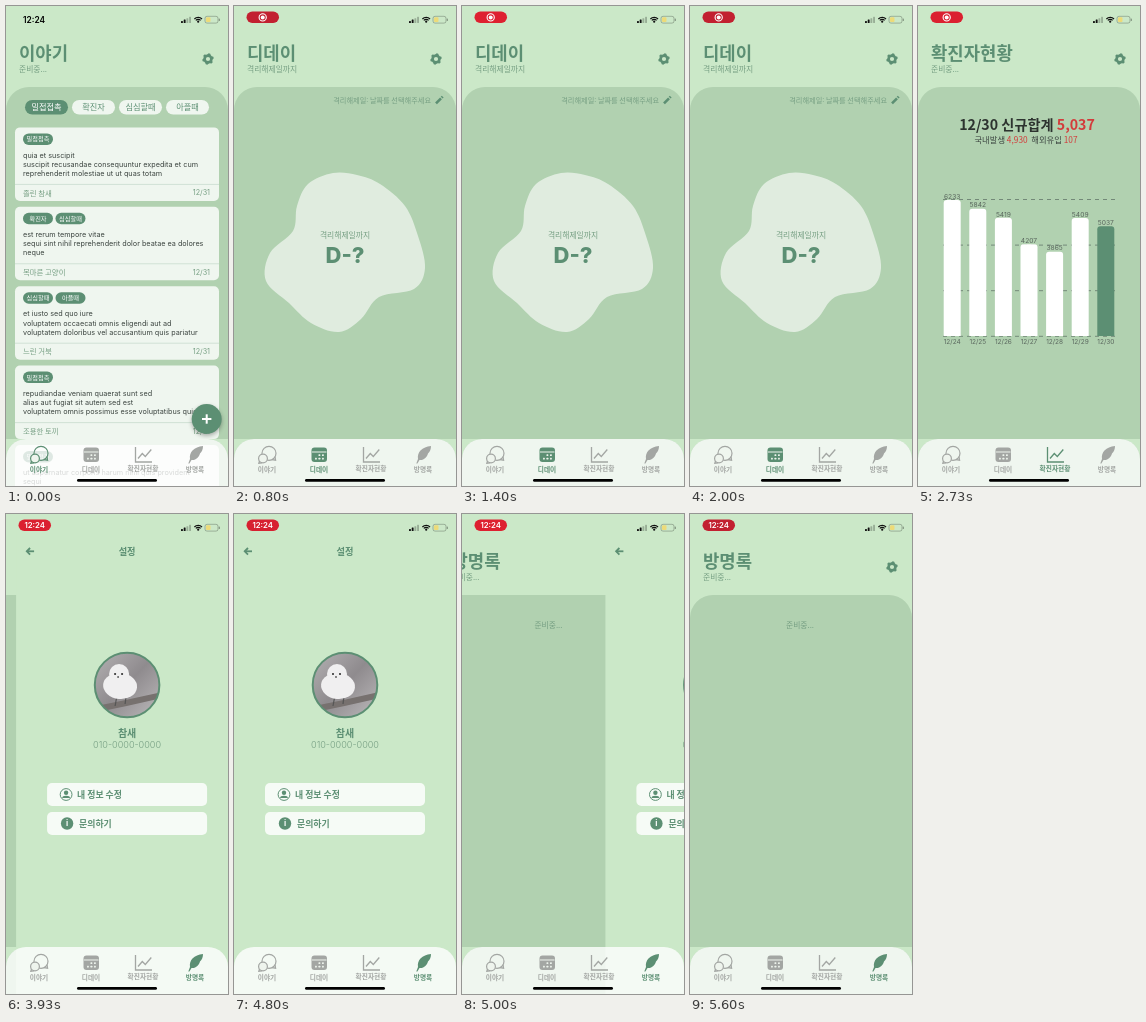
Write an HTML page with a canvas that moves like this. It is 222 by 480 pixels and loops after 5.67 s.

```html
<!DOCTYPE html>
<html lang="ko">
<head>
<meta charset="utf-8">
<style>
html, body { margin: 0; width: 100%; height: 100%; overflow: hidden; background: #cbe8c8; }
canvas { display: block; width: 222px; height: 480px; }
</style>
</head>
<body>
<canvas id="stage"></canvas>
<script>
const W = 222, H = 480, LOOP = 5670;
const canvas = document.getElementById('stage');
const c = canvas.getContext('2d');
const ratio = window.devicePixelRatio || 1;
canvas.width = W * ratio;
canvas.height = H * ratio;

const BG = '#cbe8c8', PANEL = '#b1d1b0', GREEN = '#5c8f73', SOFT = '#769f83';
const INK = '#3c4540', GREY = '#a3a6a3', RED = '#d33b3b';
const KR = '"Noto Sans CJK KR", "Noto Sans CJK", sans-serif';
const LATIN = 'Inter, sans-serif';

const TABS = ['이야기', '디데이', '확진자현황', '방명록'];
const CHIPS = ['밀접접촉', '확진자', '심심할때', '아플때'];
const CARDS = [
  { tags: [0], by: '졸린 참새', lines: ['quia et suscipit', 'suscipit recusandae consequuntur expedita et cum', 'reprehenderit molestiae ut ut quas totam'] },
  { tags: [1, 2], by: '목마른 고양이', lines: ['est rerum tempore vitae', 'sequi sint nihil reprehenderit dolor beatae ea dolores', 'neque'] },
  { tags: [2, 3], by: '느린 거북', lines: ['et iusto sed quo iure', 'voluptatem occaecati omnis eligendi aut ad', 'voluptatem doloribus vel accusantium quis pariatur'] },
  { tags: [0], by: '조용한 토끼', lines: ['repudiandae veniam quaerat sunt sed', 'alias aut fugiat sit autem sed est', 'voluptatem omnis possimus esse voluptatibus quis'] },
  { tags: [0], by: '', lines: ['ut aspernatur corporis harum nihil quis provident', 'sequi'] }
];
const CASES = [6233, 5842, 5419, 4207, 3865, 5409, 5037];
const BLOB = [[99, 167], [123, 169], [146, 178], [171, 200], [184, 230], [191, 262], [180, 283], [145, 291],
  [127, 313], [105, 326], [77, 317], [55, 297], [32, 275], [36, 247], [59, 225], [63, 200], [74, 178]];

function text(s, x, y, size, color, align = 'left', weight = 400, family = KR) {
  c.font = `${weight} ${size}px ${family}`;
  c.fillStyle = color;
  c.textAlign = align;
  c.textBaseline = 'alphabetic';
  c.fillText(s, x, y + size * 0.36);
}

function box(x, y, w, h, r, color) {
  c.beginPath();
  c.roundRect(x, y, w, h, r);
  c.fillStyle = color;
  c.fill();
}

function disc(x, y, r, color) {
  c.beginPath();
  c.arc(x, y, r, 0, 7);
  c.fillStyle = color;
  c.fill();
}

function ring(x, y, r, color, width) {
  c.beginPath();
  c.arc(x, y, r, 0, 7);
  c.strokeStyle = color;
  c.lineWidth = width;
  c.stroke();
}

function line(points, color, width) {
  c.beginPath();
  points.forEach(([x, y]) => c.lineTo(x, y));
  c.strokeStyle = color;
  c.lineWidth = width;
  c.stroke();
}

// Runs of [string, colour] centred as one line.
function runs(parts, x, y, size, weight) {
  c.font = `${weight} ${size}px ${KR}`;
  const widths = parts.map(p => c.measureText(p[0]).width);
  x -= widths.reduce((a, b) => a + b, 0) / 2;
  parts.forEach(([s, color], i) => {
    text(s, x, y, size, color, 'left', weight);
    x += widths[i];
  });
}

// Closed curve through the given points.
function smooth(pts, color) {
  const n = pts.length, at = i => pts[(i + n) % n];
  c.beginPath();
  c.moveTo(...pts[0]);
  for (let i = 0; i < n; i++) {
    const [a, p, q, b] = [at(i - 1), at(i), at(i + 1), at(i + 2)];
    c.bezierCurveTo(p[0] + (q[0] - a[0]) / 6, p[1] + (q[1] - a[1]) / 6,
      q[0] - (b[0] - p[0]) / 6, q[1] - (b[1] - p[1]) / 6, q[0], q[1]);
  }
  c.fillStyle = color;
  c.fill();
}

function gear(x, y) {
  c.beginPath();
  for (let i = 0; i < 24; i++) {
    const a = (i + 0.5) * Math.PI / 12, r = i % 4 < 2 ? 5.8 : 4.7;
    c.lineTo(x + r * Math.sin(a), y - r * Math.cos(a));
  }
  c.closePath();
  c.moveTo(x + 2.1, y);
  c.arc(x, y, 2.1, 0, 7);
  c.fillStyle = GREEN;
  c.fill('evenodd');
}

function frame(title, sub) {
  box(0, 0, W, H, 0, BG);
  text(title, 13, 47.8, 17.8, GREEN, 'left', 900);
  text(sub, 13, 63, 7.8, SOFT);
  gear(202, 53);
  box(0, 81, W, H - 81, [23, 23, 0, 0], PANEL);
}

function card(d, y) {
  box(9, y, 204, 73.5, 5, 'rgba(255,255,255,.8)');
  d.tags.forEach((t, i) => {
    box(17 + i * 32.5, y + 6, 30, 11.5, 5.75, GREEN);
    text(CHIPS[t], 32 + i * 32.5, y + 11.8, 6.2, '#fff', 'center', 500);
  });
  d.lines.forEach((s, i) => text(s, 17, y + 27.5 + i * 9.2, 7.25, INK, 'left', 400, LATIN));
  line([[9, y + 57], [213, y + 57]], 'rgba(92,143,115,.3)', 0.7);
  text(d.by, 17, y + 65.5, 7.4, SOFT, 'left', 500);
  text('12/31', 204, y + 65.5, 7.2, SOFT, 'right', 400, LATIN);
}

function stories() {
  frame(TABS[0], '준비중...');
  CHIPS.forEach((s, i) => {
    box(19 + i * 47, 94, 43, 14.5, 7.25, i ? 'rgba(255,255,255,.8)' : GREEN);
    text(s, 40.5 + i * 47, 101.2, 8.2, i ? GREEN : '#fff', 'center', 500);
  });
  CARDS.forEach((d, i) => card(d, 121.4 + i * 79.4));
  c.save();
  c.shadowColor = 'rgba(0,0,0,.3)';
  c.shadowBlur = 4 * ratio;
  c.shadowOffsetY = 2 * ratio;
  disc(200.7, 413, 15, GREEN);
  c.restore();
  line([[196, 413], [205.4, 413]], '#fff', 2);
  line([[200.7, 408.3], [200.7, 417.7]], '#fff', 2);
}

function dday() {
  frame(TABS[1], '격리해제일까지');
  text('격리해제일: 날짜를 선택해주세요', 197, 94, 7.2, SOFT, 'right', 500);
  line([[202, 97.3], [207, 92.3]], GREEN, 2.6);
  line([[207.7, 91.6], [208.7, 90.6]], GREEN, 2.6);
  smooth(BLOB, 'rgba(255,255,255,.6)');
  text('격리해제일까지', 111, 229, 7.8, SOFT, 'center');
  text('D-?', 111, 249, 22, GREEN, 'center', 800, LATIN);
}

function chart() {
  frame(TABS[2], '준비중...');
  runs([['12/30 신규합계 ', '#2d332f'], ['5,037', RED]], 109, 119, 14.2, 800);
  runs([['국내발생 ', INK], ['4,930', RED], ['  해외유입 ', INK], ['107', RED]], 108, 134, 8.3, 400);
  c.setLineDash([4, 4]);
  for (let i = 0; i < 4; i++) {
    const y = 193.5 + i * 45.6;
    line([[25, y], [197, y]], '#64786a', 0.8);
  }
  c.setLineDash([]);
  CASES.forEach((n, i) => {
    const x = 34.2 + i * 25.6, h = n * 0.0218;
    box(x - 8.5, 330 - h, 17, h, [3, 3, 0, 0], i === 6 ? GREEN : '#fff');
    text(n, x, 326.3 - h, 6.7, '#59665d', 'center', 400, LATIN);
    text('12/' + (24 + i), x, 336, 6.5, '#59665d', 'center', 400, LATIN);
  });
}

function guestbook() {
  frame(TABS[3], '준비중...');
  text('준비중...', 110, 111, 7.8, SOFT, 'center');
}

function photo() {
  c.save();
  c.beginPath();
  c.arc(111, 171, 32.5, 0, 7);
  c.clip();
  const g = c.createLinearGradient(80, 140, 142, 200);
  g.addColorStop(0, '#b3b0b2');
  g.addColorStop(0.5, '#8f8b8e');
  g.addColorStop(1, '#b9b6b8');
  c.fillStyle = g;
  c.fillRect(78, 138, 66, 66);
  line([[76, 196], [110, 189], [146, 181]], '#77716f', 6);
  line([[101, 181], [99, 192]], '#555', 1.2);
  line([[110, 182], [109, 190]], '#555', 1.2);
  disc(103, 160, 10, '#f0eff0');
  c.beginPath();
  c.ellipse(104, 172, 17, 13, 0.1, 0, 7);
  c.fill();
  disc(99, 160, 1.1, '#333');
  disc(106, 160, 1.1, '#333');
  disc(102, 163, 0.9, '#555');
  c.restore();
  ring(111, 171, 32.3, GREEN, 2);
}

function settings() {
  box(0, 0, W, H, 0, BG);
  line([[18, 37.3], [10.8, 37.3]], GREEN, 1.8);
  line([[14, 34], [10.7, 37.3], [14, 40.6]], GREEN, 1.8);
  text('설정', 111, 37.3, 9.2, GREEN, 'center', 800);
  photo();
  text('참새', 111, 219, 10, GREEN, 'center', 800);
  text('010-0000-0000', 111, 231, 9.1, SOFT, 'center', 300, LATIN);
  ['내 정보 수정', '문의하기'].forEach((s, i) => {
    box(31, 269 + i * 29, 160, 23, 5, 'rgba(255,255,255,.83)');
    text(s, 61 + i * 2, 280.3 + i * 29, 8.9, GREEN, 'left', 800);
  });
  ring(50, 280.5, 5.9, GREEN, 1);
  disc(50, 278.7, 2.2, GREEN);
  c.beginPath();
  c.ellipse(50, 284, 3.9, 2.3, 0, Math.PI, 0);
  c.fill();
  disc(51, 309.5, 6.2, GREEN);
  text('i', 51, 309.4, 8, '#fff', 'center', 700, LATIN);
}

function tabIcon(i, color) {
  if (i === 0) {
    ring(35, 447.3, 7, color, 1.2);
    disc(29, 452.5, 4.7, '#eef4ed');
    ring(29, 452.5, 4.4, color, 1.2);
    line([[25.5, 455], [24.8, 457.3], [28, 456.8]], color, 1.2);
    line([[38, 453.6], [41.6, 454.2], [41, 450.5]], color, 1.2);
  } else if (i === 1) {
    box(77.5, 441.5, 15.5, 14.5, 3, color);
    line([[78, 446], [92.5, 446]], '#eef4ed', 1);
    for (let k = 0; k < 5; k++)
      box(81 + (k + 1) % 3 * 3.5, k < 2 ? 448.3 : 451.8, 1.8, 1.8, 0.4, '#eef4ed');
  } else if (i === 2) {
    line([[129.5, 441], [129.5, 456], [146, 456]], color, 1.3);
    line([[132, 452.5], [136.3, 447.5], [139.3, 450.5], [145.3, 443.5]], color, 1.3);
  } else {
    c.beginPath();
    c.moveTo(197, 440);
    c.bezierCurveTo(188, 441, 183, 446, 184, 453);
    c.lineTo(182.3, 457.5);
    c.lineTo(183.4, 457.5);
    c.lineTo(185.5, 454);
    c.bezierCurveTo(190, 454.5, 193, 451, 194, 447.5);
    c.bezierCurveTo(196, 446, 197, 443, 197, 440);
    c.fillStyle = color;
    c.fill();
  }
}

function tabBar(active) {
  // The corners outside the rounded bar keep the page colour.
  c.beginPath();
  c.rect(0, 433, W, 47);
  c.roundRect(0, 433, W, 47, [20, 20, 0, 0]);
  c.fillStyle = BG;
  c.fill('evenodd');
  box(0, 433, W, 47, [20, 20, 0, 0], 'rgba(255,255,255,.8)');
  TABS.forEach((s, i) => {
    const color = i === active ? GREEN : GREY;
    tabIcon(i, color);
    text(s, 33 + i * 52, i === 2 ? 463 : 464, 6.7, color, 'center', 800);
  });
  box(71, 473, 80, 2.8, 1.4, '#000');
}

function statusBar(t) {
  const show = Math.min(1, Math.max(0, (t - 60) / 200));
  const clock = Math.min(1, Math.max(0, (t - 3100) / 200));
  if (show < 1) text('12:24', 28, 13.5, 8.4, `rgba(0,0,0,${1 - show})`, 'center', 600, LATIN);
  const glow = (1 - Math.cos((t - 5600) * 2 * Math.PI / 1200)) / 2;
  c.globalAlpha = show;
  box(12.5, 5.5, 32.5, 11.5, 5.75, `rgb(${194 + 28 * glow},32,48)`);
  c.globalAlpha = show * (1 - clock);
  ring(28.7, 11.4, 3.6, '#fff', 1.1);
  disc(28.7, 11.4, 2, '#fff');
  c.globalAlpha = show * clock;
  text('12:24', 28.7, 11.2, 7.8, '#fff', 'center', 600, LATIN);
  c.globalAlpha = 1;

  for (let i = 0; i < 4; i++)
    box(175 + i * 2.7, 15 - i * 1.4, 1.9, 2 + i * 1.4, 0.5, i < 2 ? '#111' : 'rgba(0,0,0,.25)');
  [5.4, 3.4].forEach(r => {
    c.beginPath();
    c.arc(192.2, 16.8, r, -Math.PI * 0.75, -Math.PI * 0.25);
    c.strokeStyle = '#111';
    c.lineWidth = 1.2;
    c.stroke();
  });
  disc(192.2, 15.7, 1.1, '#111');
  c.beginPath();
  c.roundRect(199, 10.3, 13, 6.8, 2);
  c.strokeStyle = 'rgba(0,0,0,.35)';
  c.lineWidth = 0.7;
  c.stroke();
  box(200, 11.3, 4.5, 4.8, 1.1, '#eddb78');
  box(212.8, 12.4, 1, 2.6, 0.5, 'rgba(0,0,0,.4)');
}

// Critically damped spring from 0 to 1.
function spring(ms) {
  const k = Math.max(0, ms) * 0.0182;
  return 1 - (1 + k) * Math.exp(-k);
}

function draw(t) {
  c.setTransform(ratio, 0, 0, ratio, 0, 0);
  c.clearRect(0, 0, W, H);
  const tab = t < 800 ? 0 : t < 2130 ? 1 : t < 2870 ? 2 : 3;
  const push = spring(t - 3664) - spring(t - 4880);
  c.save();
  c.translate(-0.3 * W * push, 0);
  [stories, dday, chart, guestbook][tab]();
  c.restore();
  if (push > 0.001) {
    c.save();
    c.translate(W * (1 - push), 0);
    settings();
    c.restore();
  }
  tabBar(tab);
  statusBar(t);
}

const start = performance.now();
function tick() {
  draw((performance.now() - start) % LOOP);
  requestAnimationFrame(tick);
}
tick();
</script>
</body>
</html>
```
